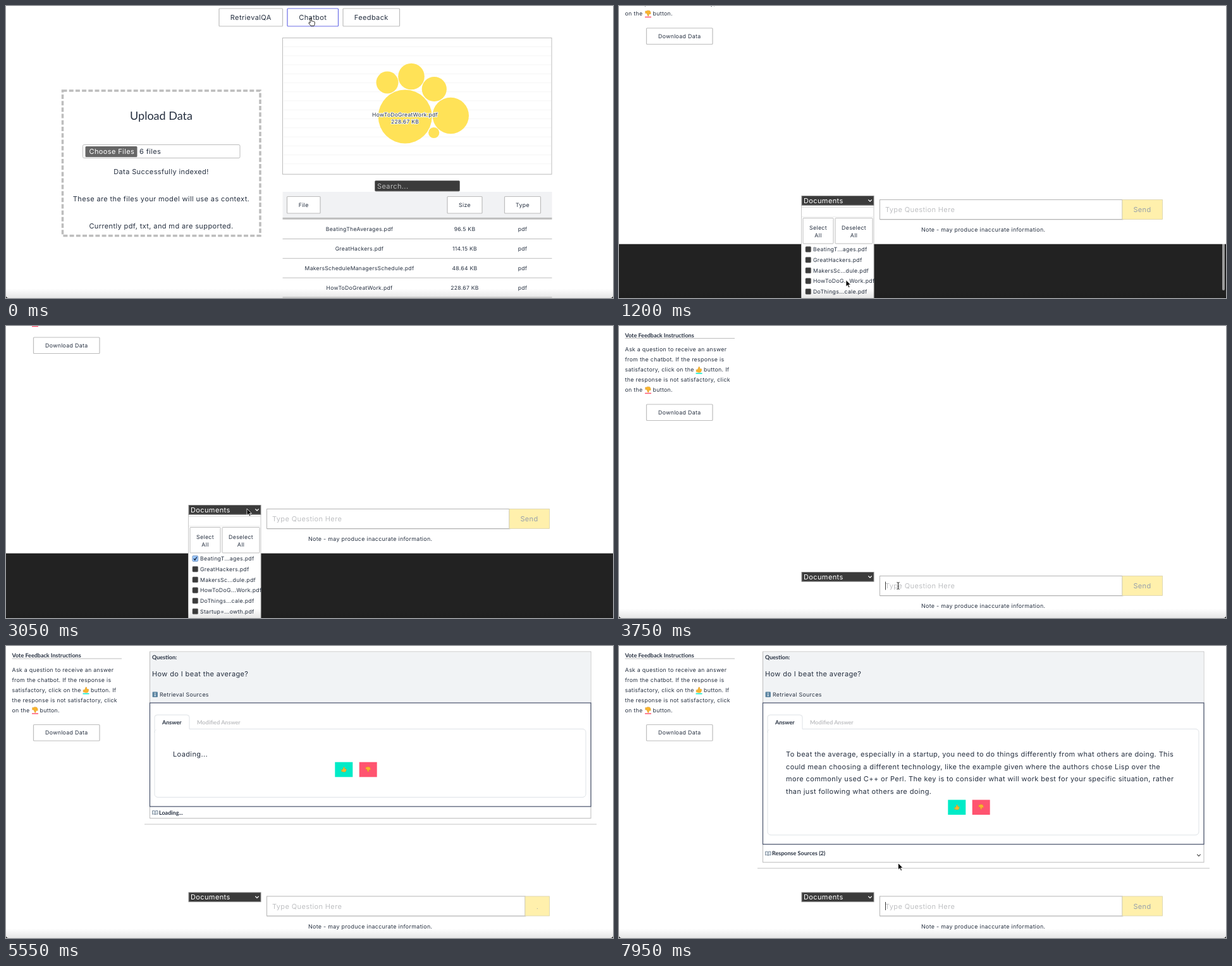
An HTML page for the animation above (8000 ms loop, 960 px wide and 462 px high).

```html
<!DOCTYPE html>
<html lang="en">
<head>
<meta charset="utf-8">
<title>Document chatbot</title>
<style>
html, body { margin: 0; width: 100%; height: 100%; overflow: hidden; background: #fff; }
svg { display: block; width: 960px; height: 462px; }
text { font-family: Inter, "Open Sans", sans-serif; letter-spacing: .035em; fill: #263040; white-space: pre; text-rendering: geometricPrecision; }
.lato { font-family: Lato, sans-serif; letter-spacing: 0; }
.bold { font-weight: 700; }
.mid { text-anchor: middle; }
.pale { fill: #bfc0c3; }
.off { fill: #98a0ab; }
.halo { stroke: #fff; stroke-width: 2px; paint-order: stroke; }
</style>
</head>
<body>
<svg id="stage" viewBox="0 0 960 462"></svg>
<script>
const LOOP = 8000, NAV_SCROLL = 42;
const GREY = '#bdbdbd', YELLOW = '#ffe257', MINT = '#00ebc7', PINK = '#ff5470';

// Markup helpers: text is placed by the middle of its capitals.
const text = (x, y, s, size = 8.8, cls = '', extra = '') =>
  `<text x="${x}" y="${(y + size * .36).toFixed(2)}" font-size="${size}" class="${cls}" ${extra}>${s}</text>`;
const mid = (x, y, s, size, cls = '') => text(x, y, s, size, 'mid ' + cls);
const box = (x, y, w, h, fill = '#fff', stroke = 'none', extra = '') =>
  `<rect x="${x}" y="${y}" width="${w}" height="${h}" fill="${fill}" stroke="${stroke}" ${extra}/>`;
const line = (x1, y, x2, color = GREY, w = 1) =>
  `<path d="M${x1} ${y}H${x2}" stroke="${color}" stroke-width="${w}"/>`;
const group = (id, body) => `<g id="${id}">${body}</g>`;
const button = (x, y, w, h, label, size = 8.8, stroke = GREY) =>
  box(x, y, w, h, '#fff', stroke, 'rx="1" stroke-width="1.2"') + mid(x + w / 2, y + h / 2, label, size);
const thumb = (x, y, down, k = 1) =>
  `<path transform="translate(${x} ${y}) scale(${k} ${down ? -k : k})" fill="#f9b42d" stroke="#c98a1b" stroke-width=".4"
    d="M-4.3 0H-2.2L-.2-4.6Q1.8-4.8 1.1-1.2H3.8Q4.8-.6 4 .4Q4.5 1.6 3.6 2Q3.8 3.2 2.9 3.3Q2.8 4.3 1.5 4.3H-1.6L-2.4 3.6H-4.3Z"/>`;
const chevron = (x, y, color) =>
  `<path d="M${x - 2.7} ${y - 1.3}l2.7 2.7 2.7-2.7" fill="none" stroke="${color}" stroke-width="1.1"/>`;

function navBar() {
  return button(337, 4, 100.5, 28, 'RetrievalQA', 11) +
    button(445, 4, 80.5, 28, 'Chatbot', 11, '#6c6ee6') +
    button(533, 4, 89.5, 28, 'Feedback', 11);
}

function filesPage() {
  let s = box(89.5, 134, 312.5, 229.5, '#fff', GREY, 'stroke-width="3.5" stroke-dasharray="7 3.2"');
  s += mid(245.5, 174, 'Upload Data', 18, 'lato');
  s += box(121.5, 219.5, 248.5, 21, '#fff', GREY, 'rx="2"') + box(125.5, 222, 82, 17, '#666', 'none', 'rx="1.5"');
  s += text(131.5, 230.3, 'Choose Files', 11, '', 'style="fill:#fff"') + text(211, 230.3, '6 files', 11);
  s += mid(245.5, 262.5, 'Data Successfully indexed!', 11);
  s += mid(245.5, 305, 'These are the files your model will use as context.', 11);
  s += mid(245.5, 348, 'Currently pdf, txt, and md are supported.', 11);
  s += box(437.5, 50.5, 425.5, 215.7, '#fff', GREY);
  for (let y = 64.5; y < 264; y += 14.25) s += line(439, y, 862, '#f5f5f5');
  for (const [x, y, r] of [[603, 121, 17.5], [641, 111.5, 20.8], [677.3, 131.5, 19.6],
    [631.2, 175, 42.5], [703.3, 173.5, 28.7], [676.7, 200.5, 8.6]])
    s += `<circle cx="${x}" cy="${y}" r="${r}" fill="${YELLOW}"/>`;
  s += mid(631, 172, 'HowToDoGreatWork.pdf', 8.5, 'halo') + mid(631, 183, '228.67 KB', 8.5, 'halo');
  s += box(583.5, 276.5, 134, 16.5, '#3b3b3b', '#777', 'rx="1.5"') +
    text(587, 285, 'Search...', 11, '', 'style="fill:#b9b9b9"');
  s += box(437.5, 294, 426, 41, '#f1f2f4') + line(437.5, 336.2, 863.5, GREY, 3);
  s += button(444.5, 301.5, 52.5, 26.5, 'File') + button(698, 301.5, 55, 26.5, 'Size') +
    button(788.5, 301.5, 57, 26.5, 'Type');
  [['BeatingTheAverages.pdf', '96.5 KB'], ['GreatHackers.pdf', '114.15 KB'],
    ['MakersScheduleManagersSchedule.pdf', '48.64 KB'], ['HowToDoGreatWork.pdf', '228.67 KB']]
    .forEach(([name, size], i) => {
      const y = 353 + i * 30.8;
      s += mid(559, y, name, 8.6) + mid(725.5, y, size, 8.6) + mid(817, y, 'pdf', 8.6) +
        line(437.5, y + 15.5, 863.5);
    });
  return s;
}

function sidebar() {
  let s = text(9.5, 14.3, 'Vote Feedback Instructions', 9, 'lato bold') + line(9.5, 19.5, 183);
  s += text(9.5, 37, 'Ask a question to receive an answer') + text(9.5, 53, 'from the chatbot. If the response is') +
    text(9.5, 69, 'satisfactory, click on the') + text(134, 69, 'button. If') +
    text(9.5, 85, 'the response is not satisfactory, click') +
    text(9.5, 101, 'on the') + text(53.5, 101, 'button.');
  s += thumb(126.5, 69) + line(121.5, 75, 131.5, MINT, 1.5);
  s += thumb(46, 100.5, true) + line(41, 106.5, 51, PINK, 1.5);
  return s + button(43.5, 124, 104.5, 25.5, 'Download Data');
}

function dropdown() {
  let s = box(288.5, 404, 114.5, 190, '#fff', '#c9c9c9') + line(289, 407.5, 403, '#ddd') + line(289, 422.5, 403, '#eee');
  for (const [x, w, label] of [[291, 48, 'Select'], [342, 59, 'Deselect']])
    s += box(x, 424.5, w, 40.5, '#fff', GREY, 'rx="1"') + mid(x + w / 2, 439.5, label) + mid(x + w / 2, 451.5, 'All');
  ['BeatingT...ages.pdf', 'GreatHackers.pdf', 'MakersSc...dule.pdf', 'HowToDoG...Work.pdf',
    'DoThings...cale.pdf', 'Startup=...owth.pdf'].forEach((name, i) => {
    const y = 474 + i * 16.7;
    s += box(295, y - 4.3, 8.6, 8.6, '#3b3b3b', '#6b6b6b', 'rx="1.3" stroke-width=".7"') + text(307, y, name, 8.7);
  });
  s += group('check', box(295, 469.7, 8.6, 8.6, '#9cc8ff', '#7fa9dd', 'rx="1.3" stroke-width=".7"') +
    '<path d="M297 474l1.8 2.3 3-4.8" fill="none" stroke="#14233c" stroke-width="1.4"/>');
  return s + group('tip', box(295, 444.5, 108, 19.5, '#262626', 'none', 'rx="3"') +
    '<path d="M298 464h8l-4 3z" fill="#262626"/>' +
    text(299, 454.5, 'BeatingTheAverages.pdf', 8, '', 'style="fill:#fff"'));
}

function inputRow() {
  const field = (w) => box(412.5, 397, w + 1, 31, 'rgba(0,0,0,.1)') + box(412.5, 395.5, w - .5, 31, '#fff', '#b5b5b5');
  const send = (x, fill) => box(x, 395.5, 859.5 - x, 31, fill, '#d9d2ac', 'stroke-width=".8"');
  let s = box(289, 389.5, 114, 14.7, '#3b3b3b', '#8a8a8a') +
    text(292, 396.8, 'Documents', 11, '', 'style="fill:#fff"') + chevron(397, 396.8, '#fff');
  s += group('idle', field(384) + send(796, '#fff0ac') + mid(827.5, 411.3, 'Send', 11, 'off'));
  s += group('ready', field(384) + send(796, YELLOW) + mid(827.5, 411.3, 'Send', 11));
  s += group('busy', field(409) + send(821, '#fff0ac') +
    '<text id="dots" x="840.5" y="415" font-size="9" class="mid off"></text>');
  s += group('hint', text(421, 411.3, 'Type Question Here', 11, 'pale'));
  s += text(421, 411.3, '', 11, '', 'id="typed"');
  s += box(0, 404.5, .9, 13, '#222', 'none', 'id="caret"');
  return s + text(478, 443, 'Note - may produce inaccurate information.', 8.9);
}

function card(grow, rows, footer, footHeight) {
  const end = 254 + grow, foot = end + footHeight / 2;
  let s = box(227.5, 9, 697.5, end + footHeight - 9, '#fff', GREY) + box(228, 9.5, 696.5, 80, '#f1f3f5');
  s += text(231, 18, 'Question:', 9, 'lato bold') + text(231, 44.5, 'How do I beat the average?', 11);
  s += box(231.5, 72.5, 8.5, 8.5, '#5f87a3', 'none', 'rx="1.2"') +
    '<path d="M235.7 74v1.4M235.7 76.4v3.2" stroke="#fff" stroke-width="1.3"/>' + text(243, 77.3, 'Retrieval Sources');
  s += box(227.5, 90, 697.5, 164 + grow, '#fff', '#46506a', 'stroke-width="1.2"');
  s += box(235, 131.3, 682, 108 + grow, '#fff', '#dee2e6', 'rx="5"');
  s += '<path d="M235 137v-24q0-4 4-4h47q4 0 4 4v19.5h-54z" fill="#fff"/>' +
    '<path d="M235 137v-24q0-4 4-4h47q4 0 4 4v18.3" fill="none" stroke="#dee2e6"/>';
  s += text(247, 120.3, 'Answer', 9, 'lato bold') + text(302, 120.3, 'Modified Answer', 9, 'lato bold pale');
  rows.forEach((row, i) => s += text(264, 170.7 + i * 19.9, row, 11));
  s += box(520.3, 183.7, 28, 23.6, MINT, 'none', `transform="translate(0 ${grow})"`) +
    box(558.7, 183.7, 28, 23.6, PINK, 'none', `transform="translate(0 ${grow})"`) +
    thumb(534.5, 195.5 + grow, false, .9) + thumb(572.7, 195 + grow, true, .9);
  s += `<path d="M231.5 ${foot - 2.5}q2.3-1 4.3.5q2-1.5 4.3-.5v5.5q-2.3-1-4.3.5q-2-1.5-4.3-.5zm4.3.5v5.5"
    fill="#dfe6ec" stroke="#66788a" stroke-width=".8"/>`;
  s += text(242, foot + .3, footer, 9, 'lato bold');
  if (grow) s += chevron(917, foot + 3, '#444');
  return s + line(219, end + footHeight + 9.5, 934, '#c4c4c4');
}

const answer = [
  'To beat the average, especially in a startup, you need to do things differently from what others are doing. This',
  'could mean choosing a different technology, like the example given where the authors chose Lisp over the',
  'more commonly used C++ or Perl. The key is to consider what will work best for your specific situation, rather',
  'than just following what others are doing.'];

const stage = document.getElementById('stage');
stage.innerHTML =
  `<defs><linearGradient id="fade" x2="0" y2="1"><stop stop-opacity="0"/><stop offset="1" stop-opacity=".1"/></linearGradient></defs>` +
  box(0, 0, 960, 462) + group('nav', navBar()) + group('files', filesPage()) +
  group('chat', box(0, 465.7, 960, 200, '#222', 'none', 'id="below"') + sidebar() +
    `<g transform="translate(0 -.5)">${group('waiting', card(0, ['Loading...'], 'Loading...', 18.5)) +
      group('answered', card(59.7, answer, 'Response Sources (2)', 28.5))}</g>` +
    group('menu', dropdown()) + inputRow()) +
  box(954, 300, 4, 150, '#fff', 'none', 'id="bar" rx="2" opacity=".55"') +
  box(0, 447, 960, 15, 'url(#fade)') +
  '<path d="M0 459q.5 2.5 4 3h-4zM960 459q-.5 2.5-4 3h4z" fill="#111"/>' +
  group('arrow', '<path d="M0 0v10.5l2.5-2.3 1.8 3.9 1.7-.8-1.8-3.7h3.3z" fill="#000" stroke="#fff" stroke-width=".8"/>') +
  group('hand', '<path d="M-1 1q1-2 2 0v4q1.2-1 1.8.3 1.2-.8 1.7.4 1.4-.5 1.7.8v2.8q-.2 2-1.2 3.2h-5q-1.3-2-3.4-4.6q.5-1.7 2.4 0z" fill="#fff" stroke="#111" stroke-width=".9" stroke-linejoin="round"/>') +
  group('beam', '<path d="M-2-5.5q2 0 2 1.5v8q0 1.5-2 1.5M2-5.5q-2 0-2 1.5M2 5.5q-2 0-2-1.5" fill="none" stroke="#222"/>');

const el = {};
stage.querySelectorAll('[id]').forEach(node => el[node.id] = node);
const show = (id, on) => el[id].style.display = on ? '' : 'none';
const move = (id, x, y) => el[id].setAttribute('transform', `translate(${x.toFixed(2)} ${y.toFixed(2)})`);

// Rows are [time, value...]; values are eased between rows.
function track(rows, t) {
  const i = rows.findIndex(r => r[0] > t);
  if (i === 0) return rows[0].slice(1);
  if (i < 0) return rows[rows.length - 1].slice(1);
  const a = rows[i - 1], b = rows[i];
  const k = (t - a[0]) / (b[0] - a[0]), e = k * k * (3 - 2 * k);
  return a.slice(1).map((v, n) => v + (b[n + 1] - v) * e);
}

const T = { swap: 50, open: 950, check: 2300, close: 3100, focus: 3750, submit: 5450, reply: 7350 };
const scroll = [[0, 0], [550, 0], [800, 42], [980, 42], [1180, 131], [1400, 131], [1550, 148], [3099, 148], [3100, 42]];
const pointer = [[0, 482, 19], [550, 482, 19], [900, 370, 396], [1000, 370, 396], [1180, 359, 433.5],
  [1400, 359, 433.5], [1650, 379, 373], [2350, 379, 373], [2550, 376, 419], [2650, 376, 419], [3000, 381, 289],
  [3120, 381, 289], [3520, 441.5, 411], [5850, 441.5, 411], [6300, 441.5, 343.5]];
const question = 'How do I beat the average?';

function typedCount(t) {
  if (t < 4550) return Math.max(0, Math.floor((t - 3750) / 57));
  if (t < 4700) return 14 + Math.floor((t - 4550) / 50);
  return 17 + Math.floor((t - 4700) / 44);
}

function render(t) {
  const sent = t >= T.submit, replied = t >= T.reply;
  const [s] = track(scroll, t), open = t >= T.open && t < T.close;
  show('files', t < T.swap);
  show('chat', t >= T.swap);
  move('nav', 0, -s);
  move('chat', 0, NAV_SCROLL - s + (sent ? .5 : 0));
  show('menu', open);
  show('below', open);
  show('bar', t > 1000 && t < 1600);
  show('check', t >= T.check);
  show('tip', t >= 1600 && t < 2430);

  const typed = sent ? '' : question.slice(0, typedCount(t));
  el.typed.textContent = typed;
  show('hint', !typed);
  show('ready', typed);
  show('busy', sent && !replied);
  show('idle', !typed && (!sent || replied));
  el.dots.textContent = '.'.repeat(1 + Math.floor(Math.max(0, t - T.submit) / 300) % 3);
  show('caret', (t >= T.focus && t < 5300) || (replied && (t - T.reply) % 1000 < 700));
  el.caret.setAttribute('x', 421 + (typed ? el.typed.getComputedTextLength() : 0));
  show('waiting', sent && !replied);
  show('answered', replied);

  const [x, y] = track(pointer, t);
  const hidden = t >= 3800 && t < 5850;
  const hand = t < 560 || (t > 1550 && t < 2680);
  const beam = (t > 3400 && t < 3800) || (t >= 5850 && t < 5960);
  show('hand', hand && !hidden);
  show('beam', beam && !hidden);
  show('arrow', !hand && !beam && !hidden);
  ['hand', 'beam', 'arrow'].forEach(id => move(id, x, y));
}

const start = performance.now();
function tick() {
  render((performance.now() - start) % LOOP);
  requestAnimationFrame(tick);
}
tick();
</script>
</body>
</html>
```
